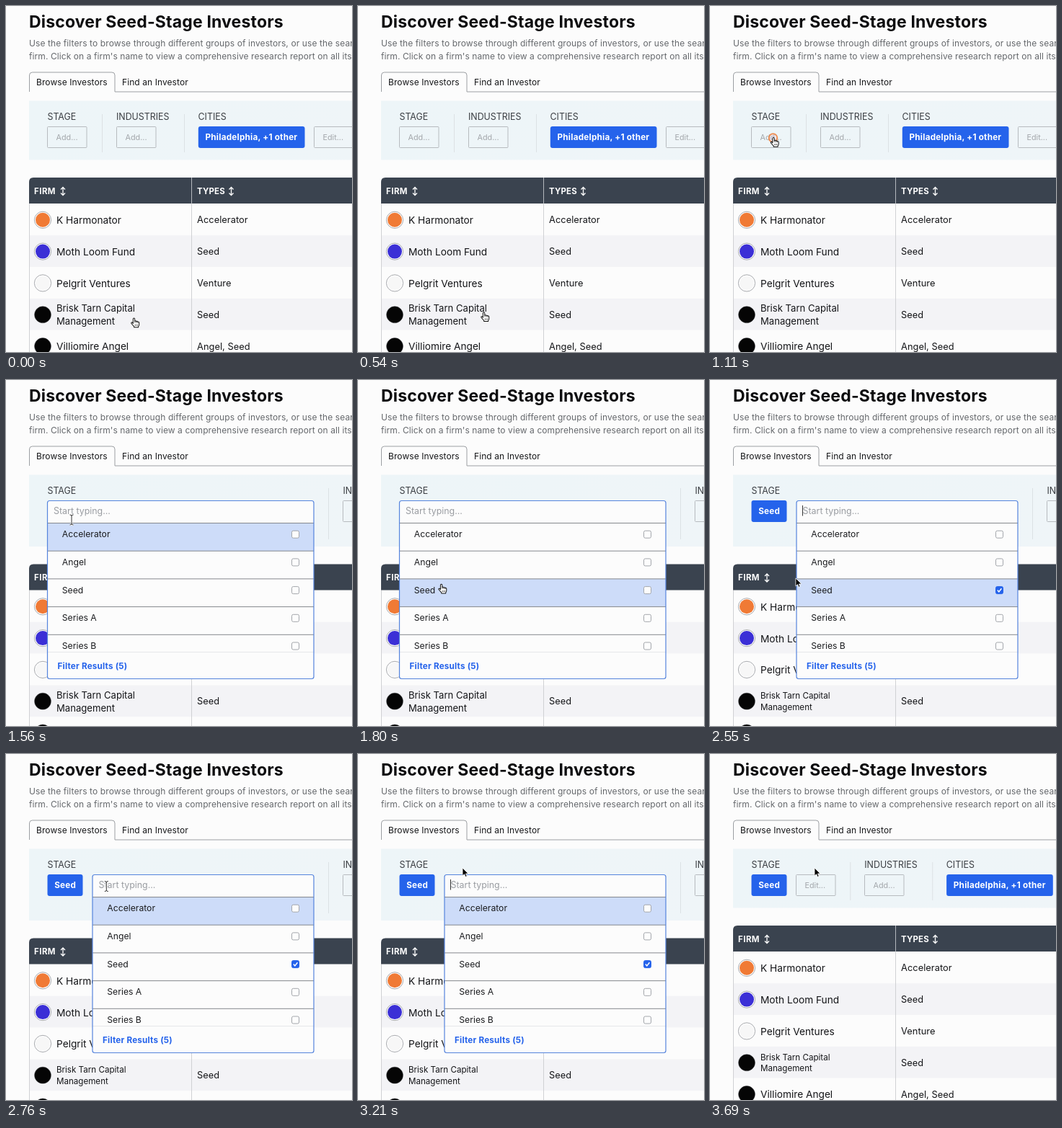
Animation of 480 by 480 pixels, one loop 3.72 s. Source, as an HTML page:

```html
<!DOCTYPE html>
<html lang="en">
<head>
<meta charset="utf-8">
<title>Investor filters</title>
<style>
  html, body { margin: 0; width: 100%; height: 100%; overflow: hidden; background: #fcfcfc; }
  svg { display: block; width: 480px; height: 480px; font-family: Inter, sans-serif; cursor: default; }
  text { white-space: pre; }
  .b { font-weight: 700; }
</style>
</head>
<body>
<svg id="stage" viewBox="0 0 480 480" xmlns="http://www.w3.org/2000/svg"></svg>
<script>
const LOOP = 3720, OPEN = 1160, PICK = 2300, CLOSE = 3255;
const BLUE = '#2563eb', RIGHT = 427, TOP = 198.5, PITCH = 38.7;
const OPTIONS = ['Accelerator', 'Angel', 'Seed', 'Series A', 'Series B'];
const ROWS = [
  ['#f07a35', 'K Harmonator', 'Accelerator'],
  ['#3b2fd6', 'Moth Loom Fund', 'Seed'],
  ['#f7f7f7', 'Pelgrit Ventures', 'Venture'],
  ['#050505', 'Brisk Tarn Capital|Management', 'Seed'],
  ['#050505', 'Villiomire Angel', 'Angel, Seed']
];
// Pointer stops: time, x, y
const PATH = [
  [0, 177.5, 433.5], [420, 177.5, 433.5], [1020, 88, 183], [1400, 88, 183],
  [1950, 118, 292.5], [2100, 118, 292.5], [2300, 115, 292.5], [2340, 115, 292.5],
  [3000, 145, 158], [LOOP, 145, 158]
];
const CLICKS = [1085, 2240, 3225];

const text = (x, y, size, fill, str, cls = '', space = 0) =>
  `<text x="${x}" y="${y}" font-size="${size}" fill="${fill}" class="${cls}" letter-spacing="${space}">${str}</text>`;
const rect = (x, y, w, h, fill, more = '') =>
  `<rect x="${x}" y="${y}" width="${w}" height="${h}" fill="${fill}" ${more}/>`;
const path = (d, stroke, width = 1, more = '') =>
  `<path d="${d}" fill="none" stroke="${stroke}" stroke-width="${width}" ${more}/>`;

const label = (x, str) => text(x, 157.5, 12.4, '#3c3f44', str);
const ghost = (x, str) =>
  rect(x + .5, 167.5, 54.5, 29, 'none', 'stroke="#b7bbbf" rx="1"') + text(x + 12.5, 186, 10.8, '#a3a7ab', str);
const pill = (x, w, str) =>
  rect(x, 167, w, 30, BLUE, 'rx="3"') + text(x + 9.7, 186.3, 11.7, '#fff', str, 'b', .24);
const divider = (x, bottom) => path(`M${x + .5} 150V${bottom}`, '#dce1e4');
const sort = (x, y) =>
  path(`M${x} ${y - 5}V${y + 5}M${x - 3} ${y - 2.5}L${x} ${y - 5.5}L${x + 3} ${y - 2.5}` +
    `M${x - 3} ${y + 2.5}L${x} ${y + 5.5}L${x + 3} ${y + 2.5}`, '#fff', 1.3);

function head() {
  return text(32, 29.5, 23, '#0c0c0e', 'Discover Seed-Stage Investors', 'b', .16) +
    text(32, 55.5, 12, '#65686c', 'Use the filters to browse through different groups of investors, or use the search to find a', '', .1) +
    text(32, 73.5, 12, '#65686c', 'firm. Click on a firm\'s name to view a comprehensive research report on all its', '', .08) +
    path('M32.5 119V96q0-4 4-4H147q4 0 4 4V119H480', '#9c9fa3') +
    text(42, 109.5, 12, '#17181a', 'Browse Investors', '', .08) +
    text(161, 109.5, 12, '#17181a', 'Find an Investor', '', .08);
}

function table(dy, small) {
  let s = `<g transform="translate(0 ${dy})">`;
  ROWS.forEach(([color, name, type], i) => {
    const top = 274.5 + i * 43.8, mid = top + 22.3;
    s += rect(32, top, 448, 43.8, i % 2 ? '#f3f3f6' : '#fcfcfc');
    s += `<circle cx="51" cy="${mid}" r="11.6" fill="#fff" stroke="#a8aaae"/>` +
      `<circle cx="51" cy="${mid}" r="${i > 2 ? 11.4 : 10}" fill="${color}"/>`;
    const lines = name.split('|');
    if (lines.length > 1) {
      const size = small ? 11.6 : 13.1, gap = small ? 7.8 : 9, base = mid + size * .34 + .4;
      s += text(70, base - gap, size, '#141518', lines[0]) + text(70, base + gap, size, '#141518', lines[1]);
    } else {
      s += text(70, mid + 5.4, 13.7, '#141518', name);
    }
    s += text(265, mid + 4.6, 12.8, '#141518', type, '', .06);
  });
  s += path('M32.5 274V500M257.5 274V500', '#d0d1d4');
  s += '<path d="M32 274V244q0-6 6-6H480V274Z" fill="#3a434f"/>' + path('M257.5 238V274', '#b4b8bd');
  s += text(39, 260.5, 11.4, '#fff', 'FIRM', 'b', .5) + sort(79, 257) +
    text(265, 260.5, 11.4, '#fff', 'TYPES', 'b', .2) + sort(312.5, 257);
  return s + '</g>';
}

function filters(open, picked) {
  let s = rect(32, 131.5, 448, open ? 99.5 : 82, 'url(#tint)') + label(57.5, 'STAGE');
  if (picked) s += pill(57.5, 49, 'Seed');
  if (open) return s + divider(447, 221) + label(467.5, 'INDUSTRIES') + ghost(467, '');
  const dx = picked ? 61.3 : 0;
  s += picked ? ghost(119, 'Edit...') : ghost(57, 'Add...');
  return s + divider(133 + dx, 203) + label(153 + dx, 'INDUSTRIES') + ghost(Math.round(152.7 + dx), 'Add...') +
    divider(247 + dx, 203) + label(266.5 + dx, 'CITIES') +
    pill(266.8 + dx, 147.7, 'Philadelphia, +1 other') + ghost(427 + dx, 'Edit...');
}

function menu(left, hover, picked, caret) {
  const w = RIGHT - left;
  let s = rect(left, 167.5, w, 247, '#fcfcfc', 'rx="3"');
  s += rect(left, TOP + hover * PITCH, w, PITCH, '#cddcf9');
  s += text(left + 8.5, 185.5, 12.4, '#9a9da2', 'Start typing...');
  if (caret) s += path(`M${left + 8.5} 174V188.5`, '#333');
  OPTIONS.forEach((name, i) => {
    const y = TOP + i * PITCH, mid = y + 15.7, on = picked && i === 2;
    s += path(`M${left} ${y}H${RIGHT}`, '#85888d') + text(left + 20.3, mid + 4.1, 12.2, '#1b1c1f', name);
    s += rect(396.5, mid - 5, 10, 10, on ? BLUE : '#fdfdfd', `rx="2" stroke="${on ? BLUE : '#a3a6ab'}"`);
    if (on) s += path(`M398.8 ${mid}l2 2.3 3.6-4.6`, '#fff', 1.5);
  });
  s += rect(left, 377.5, w, 36, '#fcfcfc') + path(`M${left} 377.5H${RIGHT}`, '#e6e8ea');
  s += text(left + 14, 400.8, 11.7, BLUE, 'Filter Results (5)', 'b', .2);
  return s + rect(left, 167.5, w, 247, 'none', 'rx="3" stroke="#5584dd" stroke-width="1.2"');
}

const BEAM = 'M0-6V6M-2.5-7Q0-7 0-5.5Q0-7 2.5-7M-2.5 7Q0 7 0 5.5Q0 7 2.5 7';
const POINTERS = {
  arrow: '<path d="M0 0V11L2.6 8.7 4.2 12.4 6.1 11.6 4.5 8H8Z" fill="#000" stroke="#fff" stroke-width=".8"/>',
  beam: path(BEAM, '#fff', 2.4) + path(BEAM, '#333'),
  hand: '<g transform="scale(.92)"><path d="M-1.3 7.5V1Q-1.3-.5 0-.5Q1.3-.5 1.3 1V4Q2.6 3.2 3.6 4.4Q5 3.8 5.8 5Q7.8 4.8 7.8 6.6V9' +
    'Q7.8 11 6.6 12V13.3H.2V12Q-2.3 9.5-4 7.3Q-4.3 5.5-2.7 5.9Z" fill="#fff" stroke="#111" stroke-width="1.1" stroke-linejoin="round"/>' +
    path('M1.3 4V6.5M3.6 4.6V6.7M5.8 5.2V7M1.8 9V11M3.6 9V11M5.4 9V11', '#222', .8) + '</g>'
};

const ease = u => u < .5 ? 4 * u ** 3 : 1 - (2 - 2 * u) ** 3 / 2;

function pointerAt(t) {
  const i = PATH.findIndex(p => p[0] > t), [t0, x0, y0] = PATH[i - 1], [t1, x1, y1] = PATH[i];
  const k = ease((t - t0) / (t1 - t0));
  return [x0 + (x1 - x0) * k, y0 + (y1 - y0) * k];
}

function pointerKind(x, y, open, left) {
  if (!open) return y > 278 || (y > 167 && y < 197 && x < 113) ? 'hand' : 'arrow';
  if (x < left || y < 167.5) return 'arrow';
  return y < TOP ? 'beam' : 'hand';
}

document.getElementById('stage').innerHTML =
  `<defs><linearGradient id="tint"><stop stop-color="#edf5f8"/><stop offset="1" stop-color="#eff5f8"/></linearGradient></defs>
  ${head()}<g id="page"></g><g id="menu"></g><g id="ring"></g><g id="pointer"></g>`;

// Rewrites a layer only when its markup changes
const cache = {};
function put(id, html) {
  if (cache[id] !== html) document.getElementById(id).innerHTML = cache[id] = html;
}

function draw(t) {
  const open = t >= OPEN && t < CLOSE, picked = t >= PICK;
  const left = picked ? 120 : 57.5;
  const [x, y] = pointerAt(t);
  put('page', filters(open, picked) + table(open ? 17.5 : 0, picked));

  const row = Math.floor((y - TOP) / PITCH);
  const hover = picked && x < left ? 2 : Math.max(0, Math.min(2, row));
  const caret = t < 1500 || (t >= 2000 && t < 2700) || t >= 3190;
  put('menu', open ? menu(left, hover, picked, caret) : '');

  const click = CLICKS.find(c => t >= c && t < c + 200);
  const age = click === undefined ? 0 : (t - click) / 200;
  put('ring', age ? `<circle cx="${x - .5}" cy="${y}" r="${4.5 + 10 * age}" fill="#f3c9dc" fill-opacity="${.3 * (1 - age)}" stroke="#ee7d35" stroke-width="2" stroke-opacity="${.95 * (1 - age)}"/>` : '');

  put('pointer', POINTERS[pointerKind(x, y, open, left)]);
  document.getElementById('pointer').setAttribute('transform', `translate(${x} ${y})`);
}

const start = performance.now();
function tick() {
  draw((performance.now() - start) % LOOP);
  requestAnimationFrame(tick);
}
tick();
</script>
</body>
</html>
```
